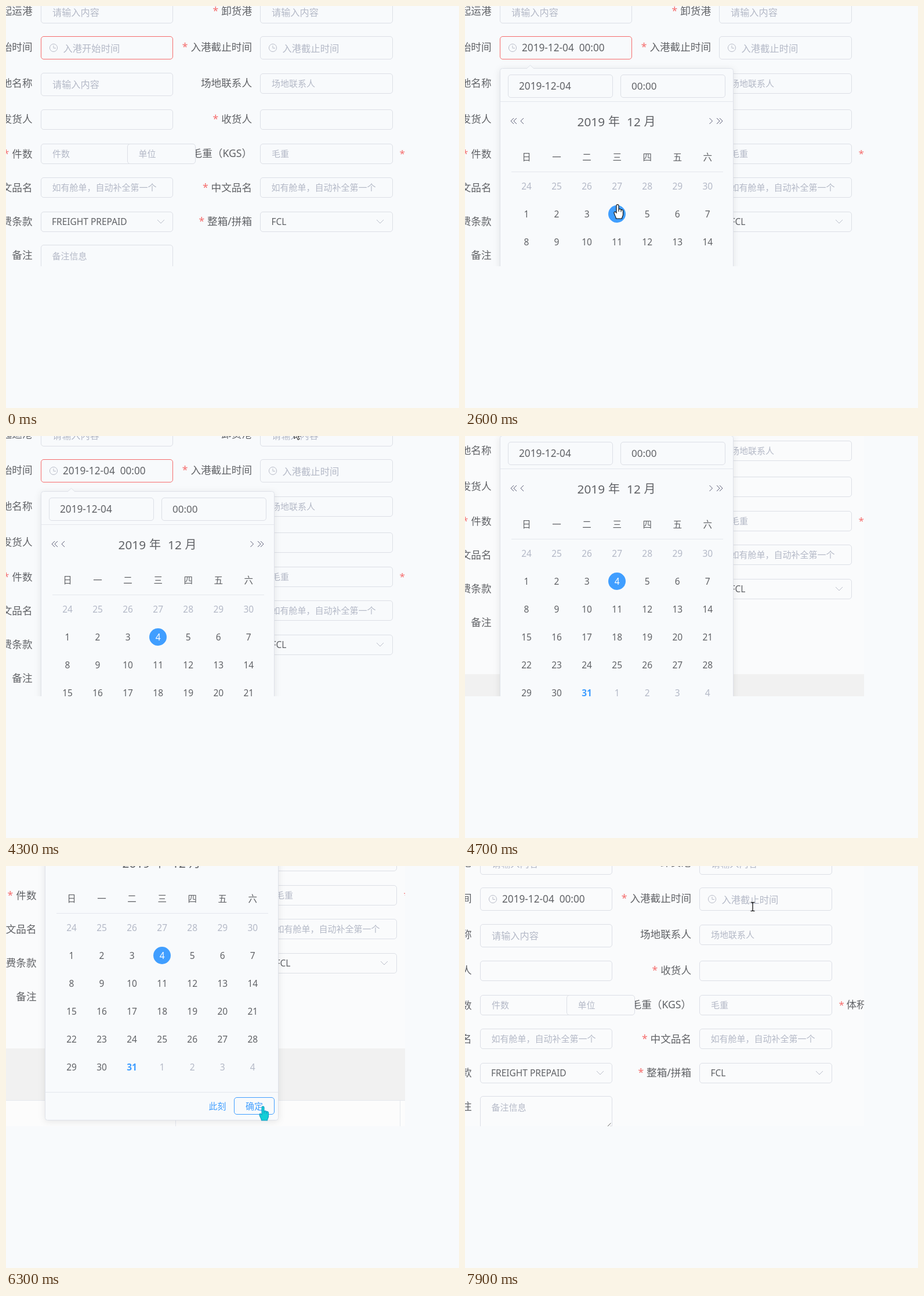
Animation, 781 px wide and 692 px high, one loop 8000 ms. Source, as an HTML page:

```html
<!DOCTYPE html>
<html lang="zh">
<head>
<meta charset="utf-8">
<title>Date picker form</title>
<style>
html, body { margin: 0; width: 100%; height: 100%; overflow: hidden; background: #f8fafc; }
svg { display: block; }
text { font-family: "Noto Sans", "Noto Sans CJK SC", "Noto Sans CJK", sans-serif; fill: #606266; white-space: pre; }
.ph { fill: #b4b9c7; }
.star { fill: #f56c6c; }
.box { stroke: #dcdfe6; }
.line { stroke: #e4e7ed; fill: none; }
.icon { stroke: #b9bdc9; fill: none; }
.nav { stroke: #5c5f78; fill: none; }
.panel { fill: #f8fafc; stroke: #dfe2e9; }
.shadow { filter: drop-shadow(0 2px 6px rgba(0, 0, 0, .09)); }
.blue { fill: #409eff; }
.bold { font-weight: 700; }
</style>
</head>
<body>
<svg id="stage" width="781" height="692" viewBox="0 0 781 692"></svg>
<script>
const STEP = 100, LOOP = 8000;
const PICK = 2300, CONFIRM = 6400;

// ---- markup helpers; y is the middle of the glyphs ----
const text = (s, x, y, size, attr = '') =>
  `<text x="${x}" y="${y + size * 0.37}" font-size="${size}" ${attr}>${s}</text>`;
const hint = (s, x, y, size) => text(s, x, y, size, 'class="ph"');
const mid = (s, x, y, size, attr = '') => text(s, x, y, size, 'text-anchor="middle" ' + attr);
const box = (x, y, w, h, attr = 'class="box"') =>
  `<rect x="${x + .5}" y="${y + .5}" width="${w - 1}" height="${h - 1}" rx="4.5" ${attr}/>`;
const path = (d, cls = 'icon', attr = '') => `<path d="${d}" class="${cls}" ${attr}/>`;
const star = (x, y) => text('*', x, y, 17, 'class="star"');
const label = (s, x, y, required) => text(
  required ? `<tspan class="star">*</tspan><tspan dx="5">${s}</tspan>` : s,
  x, y, 17.6, 'text-anchor="end"');
const clock = (x, y) =>
  `<circle cx="${x}" cy="${y}" r="6.6" class="icon"/>` + path(`M${x} ${y - 4}v4.5h4`);
const chevron = (x, y) => path(`M${x - 6} ${y - 3}l6 6 6-6`);
const arrow = (x, y, dir) => path(`M${x} ${y - 5}l${5 * dir} 5l${-5 * dir} 5`, 'nav');

function form() {
  const L = 60, R = 438, W = 228, LX = 45.5, RX = 424;
  const auto = '如有舱单，自动补全第一个';
  return [
    label('起运港', LX, 8), box(L, -10, W, 40), hint('请输入内容', 80, 10.5, 16.2),
    label('卸货港', RX, 8, 1), box(R, -10, W + 1, 40), hint('请输入内容', 458, 10.5, 16.2),

    label('入港开始时间', LX, 70), box(L, 52, W, 40, 'class="box" id="startBox"'), clock(82, 72),
    text('入港开始时间', 98.5, 72.5, 16.3, 'class="ph" id="startHint"'),
    text('2019-12-04  00:00', 98, 72, 17.2, 'id="startValue"'),
    path('M99.5 62v21', '', 'id="caret" stroke="#333"'),
    label('入港截止时间', RX, 70, 1), box(R, 52, W + 1, 40), clock(460, 72),
    hint('入港截止时间', 476.5, 72.5, 16.3),

    label('场地名称', LX, 132.5), box(L, 115, W, 40), hint('请输入内容', 80, 135.5, 16.2),
    label('场地联系人', RX, 132.5), box(R, 116, W + 1, 35), hint('场地联系人', 458, 133.5, 15),

    label('发货人', LX, 194.5), box(L, 178, W, 35),
    label('收货人', RX, 194.5, 1), box(R, 178, W + 1, 35),

    label('件数', LX, 254, 1), label('毛重（KGS）', RX, 253.5, 1),
    box(L, 237, 160, 35), box(209, 237, 118, 35),
    hint('件数', 80, 254.5, 15), hint('单位', 228.5, 254.5, 15),
    box(R, 237, W + 1, 35), hint('毛重', 458, 254.5, 15),
    star(678.5, 254), text('体积（CBM）', 691.5, 253.5, 17.6),

    label('英文品名', LX, 312), box(L, 295, W, 35), hint(auto, 79.5, 312.5, 15),
    label('中文品名', RX, 312, 1), box(R, 295, W + 1, 35), hint(auto, 457.5, 312.5, 15),

    label('运费条款', LX, 370.5), box(L, 354, W, 35),
    text('FREIGHT PREPAID', 79, 371.5, 15.5), chevron(267, 371),
    label('整箱/拼箱', RX, 370.5, 1), box(R, 354, W + 1, 35),
    text('FCL', 457.5, 371.5, 15.5), chevron(645, 371),

    label('备注', LX, 428.5), box(L, 411, W, 59), hint('备注信息', 79.5, 430.5, 15),
    path('M275.5 467.5l10-10M280.5 467.5l5-5', '', 'stroke="#666"'),

    '<rect x="-40" y="518" width="800" height="89" fill="#f1f1f1"/>',
    '<rect x="-40" y="607" width="800" height="80" fill="#fcfcfc"/>',
    path('M-40 607.5H760M285.5 607v80M672.5 607v80', 'line')
  ].join('');
}

const colX = c => 106 + 52.05 * c;
const rowY = r => 310.5 + 48 * r;

function cells() {
  let out = '';
  for (let i = 0; i < 42; i++) {
    const n = i < 7 ? 24 + i : i < 38 ? i - 6 : i - 37;
    const cls = i < 7 || i > 37 ? 'ph' : n === 31 ? 'blue bold' : '';
    out += mid(n, colX(i % 7), rowY(Math.floor(i / 7)), 15.5, `class="${cls}" data-cell="${i}"`);
  }
  return out;
}

function popup() {
  return [
    '<rect x="60.5" y="107.5" width="402" height="534" rx="4" class="panel shadow"/>',
    path('M106 108l6.500-6 6.500 6', 'panel'),
    box(74, 118, 181, 40, 'class="box" fill="none"'),
    box(268, 118, 181, 40, 'class="box" fill="none"'),
    '<g id="empty">', hint('选择日期', 94, 138, 16.2), hint('选择时间', 288, 138, 16.2), '</g>',
    '<g id="filled">', text('2019-12-04', 93, 138, 17.2), text('00:00', 287, 138, 17),
    '<circle cx="262" cy="358" r="15" class="blue"/>', '</g>',
    path('M61 164.5H462', 'line'),
    arrow(84, 198, -1), arrow(89, 198, -1), arrow(101, 198, -1),
    arrow(421.5, 198, 1), arrow(434, 198, 1), arrow(439, 198, 1),
    text('2019', 193.5, 199, 20.8), text('年', 247, 199, 20),
    text('12', 279, 199, 20.8), text('月', 308.5, 199, 20),
    [...'日一二三四五六'].map((d, i) => mid(d, colX(i), 260.5, 15.5)).join(''),
    path('M80 285.5H445', 'line'),
    cells(),
    path('M61 593.5H462', 'line'),
    mid('此刻', 357.5, 617, 15, 'class="blue"'),
    box(386, 602, 70, 30, 'id="okBox" fill="none"'),
    mid('确定', 421, 617, 15, 'id="okText"')
  ].join('');
}

const pointers = {
  a: path('M0 0V16.500L3.800 13L6.300 18.600L8.800 17.500L6.400 12H11.500Z', '', 'fill="#fff" stroke="#000"'),
  h: path('M-2 1.500C-2-.7 2-.7 2 1.500V8C4 7 6 7.500 6 9C8 8 9.500 9 9.500 11V17C9.500 20 7.500 21 7.500 24H-2.500C-3 20-6 17-6 14C-6 11.500-3.500 12-2 14ZM2 8v4M6 9v3.500', '', 'id="hand" stroke-width="1.1"'),
  i: path('M-3.500-7.500H-1L0-6.500L1-7.500H3.500M0-6.500V6.500M-3.500 7.500H-1L0 6.500L1 7.500H3.500', '', 'fill="none" stroke="#000" stroke-width="1.2"')
};

document.getElementById('stage').innerHTML = `
  <clipPath id="window"><rect width="688" height="448"/></clipPath>
  <rect width="781" height="692" fill="#f8fafc"/>
  <g clip-path="url(#window)">
    <rect id="back" width="688" height="448"/>
    <g id="page"><g id="form">${form()}</g><g id="popup">${popup()}</g></g>
    ${Object.keys(pointers).map(k => `<g id="ptr-${k}">${pointers[k]}</g>`).join('')}
  </g>`;

// ---- motion: time, x, y (and pointer kind) ----
const scroll = [
  [4100, 0, 0], [4200, 0, -11], [4300, 0, -12], [4500, 0, -56], [4600, 0, -86],
  [4800, 0, -130], [5100, 7, -196], [5200, 7, -204], [7100, 7, -204],
  [7400, 11, -49], [7700, -34, -15]
];
const pointer = [
  [0, 490, -40, 'a'], [100, 490, 103, 'a'], [500, 210, 80, 'i'], [700, 210, 80, 'i'],
  [900, 212, 100, 'a'], [1400, 240, 330, 'h'], [1600, 263, 375, 'h'], [1700, 263, 342, 'h'],
  [2600, 263, 342, 'h'], [3100, 262, 358, 'h'], [3300, 255, 384, 'h'], [3600, 86, 195, 'h'],
  [3700, 160, 150, 'a'], [4000, 497, -12, 'a'], [4300, 497, -12, 'a'], [4400, 497, -30, 'a'],
  [5300, 497, -30, 'a'], [5500, 630, 90, 'a'], [5800, 111, 250, 'h'], [6200, 443, 414, 'h'],
  [6300, 443, 414, 'h'], [6600, 470, -30, 'a'], [6900, 488, -30, 'a'], [7000, 488, -16, 'a'],
  [7100, 488, -16, 'a'], [7200, 488, -30, 'a'], [7600, 488, -30, 'a'], [7700, 488, -16, 'a'],
  [7800, 488, -16, 'a'], [7900, 496, 70, 'i']
];

function at(keys, t) {
  let i = 0;
  while (i < keys.length - 1 && keys[i + 1][0] <= t) i++;
  const a = keys[i], b = keys[i + 1] || a;
  const k = b === a ? 0 : Math.max(0, (t - a[0]) / (b[0] - a[0]));
  return { x: a[1] + (b[1] - a[1]) * k, y: a[2] + (b[2] - a[2]) * k, kind: a[3] };
}

const $ = id => document.getElementById(id);
const show = (id, on) => { $(id).style.display = on ? '' : 'none'; };
const clamp = v => Math.max(0, Math.min(1, v));
const dayCells = [...document.querySelectorAll('[data-cell]')];

function draw(t) {
  const s = at(scroll, t), p = at(pointer, t);
  const sx = Math.round(s.x), sy = Math.round(s.y);
  const picked = t >= PICK;

  const paper = t < 4400 ? '#f8fafc' : '#fafbfc';
  $('back').setAttribute('fill', paper);
  $('form').setAttribute('fill', paper);
  $('page').setAttribute('transform', `translate(${sx} ${sy})`);

  $('startBox').style.stroke = t < CONFIRM ? '#f56c6c' : '';
  show('startHint', !picked);
  show('startValue', picked);
  show('caret', (t >= 700 && t < 1100) || (t >= 1600 && t < 2100));
  show('empty', !picked);
  show('filled', picked);

  const grow = 1 - (1 - clamp((t - 620) / 300)) ** 3;
  const open = t < CONFIRM ? grow : (1 - clamp((t - 6350) / 250)) ** 2;
  show('popup', open > 0);
  $('popup').style.opacity = open;
  $('popup').setAttribute('transform', `translate(0 ${107 * (1 - open)}) scale(1 ${open})`);

  const hx = p.x - sx, hy = p.y - sy + 8;
  dayCells.forEach((el, i) => {
    const over = i > 6 && i < 38 && p.kind === 'h' &&
      Math.abs(hx - colX(i % 7)) < 24 && Math.abs(hy - rowY(Math.floor(i / 7))) < 20;
    el.style.fill = i === 10 && picked ? '#fff' : over ? '#409eff' : '';
  });
  const ok = t >= 6200 && t < 6700;
  $('okBox').setAttribute('stroke', ok ? '#409eff' : '#dcdfe6');
  $('okText').style.fill = ok ? '#409eff' : '';

  for (const k in pointers) show('ptr-' + k, k === p.kind);
  $('ptr-' + p.kind).setAttribute('transform', `translate(${p.x} ${p.y})`);
  const tinted = t >= 6200;
  $('hand').setAttribute('fill', tinted ? '#14cfd6' : '#fff');
  $('hand').setAttribute('stroke', tinted ? '#1499c4' : '#000');
}

const start = performance.now();
function tick() {
  const t = (performance.now() - start) % LOOP;
  draw(Math.floor(t / STEP) * STEP);
  requestAnimationFrame(tick);
}
tick();
</script>
</body>
</html>
```
